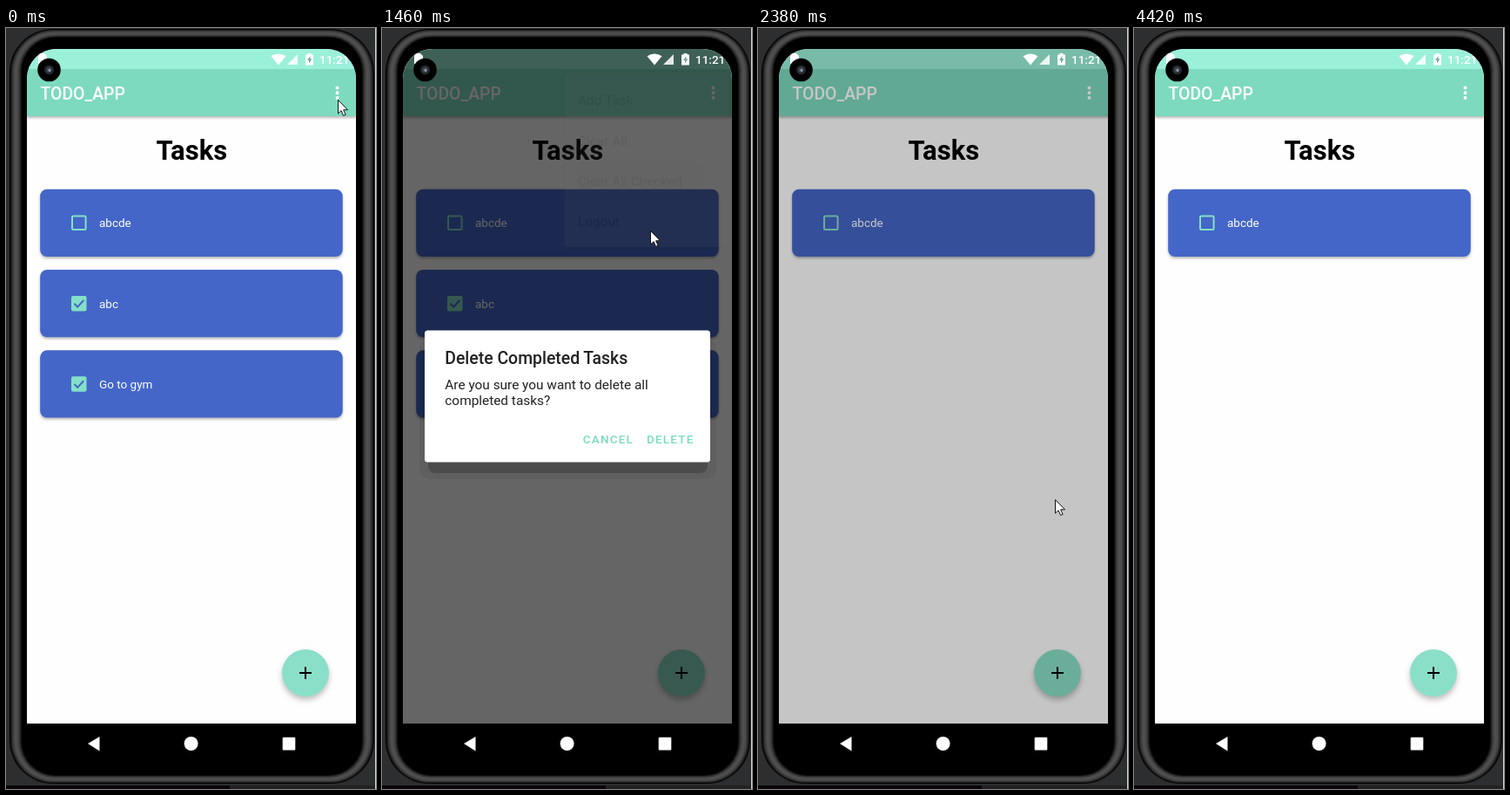
An HTML page that plays this animation: 425x872 px, repeating every 4.59 s.

```html
<!DOCTYPE html>
<html lang="en">
<head>
<meta charset="utf-8">
<title>Task list</title>
<style>
  html, body { margin: 0; width: 100%; height: 100%; overflow: hidden; background: #2c2e30; }
  svg { display: block; width: 425px; height: 872px; font-family: Roboto, sans-serif; }
  .medium { font-weight: 500; }
  .raised { filter: drop-shadow(0 2px 1.5px rgba(0, 0, 0, .28)); }
  .label { font-size: 13.5px; fill: #fff; }
  .item { font-size: 15.4px; fill: #212121; }
  .button { font: 500 13.5px Roboto, sans-serif; letter-spacing: 1.2px; fill: #7bdcc0; }
</style>
</head>
<body>
<svg viewBox="0 0 425 872">
  <defs>
    <clipPath id="screen"><path d="M24 797V58a34 34 0 0 1 34-34H368a34 34 0 0 1 34 34V797Z"/></clipPath>
    <clipPath id="reveal"><rect id="revealBox" y="48"/></clipPath>
  </defs>

  <rect width="425" height="872" fill="#2c2e30"/>
  <rect y="868" width="257" height="4" fill="#0b0508"/>
  <rect x="257" y="868" width="168" height="4" fill="#222"/>
  <rect x="424" width="1" height="872" fill="#d8d8d8"/>
  <g id="body"></g>

  <g clip-path="url(#screen)">
    <rect x="24" y="24" width="378" height="773" fill="#fefefe"/>
    <rect x="24" y="40" width="378" height="61" fill="#7ddabf" class="raised"/>
    <rect x="24" y="24" width="378" height="23" fill="#9bf0da"/>
    <text x="39.5" y="82" font-size="19.4" class="medium" fill="#fff">TODO_APP</text>
    <path d="M380.5 68.500v0M380.500 74.200v0M380.500 80v0" stroke="#fff" stroke-width="4" stroke-linecap="round"/>
    <text x="213.300" y="151" font-size="31" font-weight="700" text-anchor="middle">Tasks</text>

    <g id="cards"></g>

    <circle cx="344" cy="739" r="27" fill="#8adfc8" style="filter:drop-shadow(0 4px 3px rgba(0,0,0,.25))"/>
    <path d="M337 739h14M344 732v14" stroke="#000" stroke-width="2"/>

    <g id="menu" clip-path="url(#reveal)">
      <rect x="209.500" y="51" width="188.500" height="200" rx="3" fill="#fff" style="filter:drop-shadow(0 1.500px 2px rgba(0,0,0,.35))"/>
      <g id="press">
        <rect x="209.500" y="152" width="188.500" height="46" fill-opacity=".06"/>
        <rect x="222" y="152" width="146" height="46" rx="14" fill-opacity=".05"/>
      </g>
      <g id="items" class="item"></g>
    </g>

    <rect id="scrim" x="24" y="24" width="378" height="773"/>

    <g id="dialog">
      <g id="shadow">
        <rect x="43" y="356" width="341" height="161" rx="12" fill-opacity=".06"/>
        <rect x="53" y="360" width="321" height="150" rx="8" fill-opacity=".2"/>
      </g>
      <rect x="49" y="346.500" width="328" height="151" rx="3.500" fill="#fff"/>
      <text x="72.300" y="384.500" font-size="19.400" class="medium" fill="#212121">Delete Completed Tasks</text>
      <text x="72.300" y="414" class="item">Are you sure you want to delete all</text>
      <text x="72.300" y="432" class="item">completed tasks?</text>
      <text x="230.700" y="476" class="button">CANCEL</text>
      <text x="304" y="476" class="button">DELETE</text>
    </g>

    <!-- status icons -->
    <g fill="#fff">
      <path d="M37 29h7l3 3v9H37Z"/>
      <path d="M313 42.500L304.500 32.300Q313 26.500 321.500 32.300Z"/>
      <path d="M323 42L335 30V42Z" fill-opacity=".85"/>
      <path d="M344 30.500h2.500V29h4v1.500H353V42.500H344Z"/>
      <path d="M349.500 32l-3.500 5h2v3.500l3.300-5h-1.800Z" fill="#75a799"/>
      <text x="360" y="41" font-size="13.500" class="medium">11:21</text>
    </g>
  </g>

  <circle cx="49.500" cy="48" r="13.300"/>
  <circle cx="49.500" cy="48" r="5.500" fill="#24272d"/>
  <circle cx="49.500" cy="48" r="3" fill="#464d59"/>
  <circle cx="50" cy="48.500" r="1.200" fill="#a9b3c2"/>

  <g fill="#fff">
    <path d="M94 820l13.500-8v16.500Z"/>
    <circle cx="212.600" cy="820" r="8"/>
    <rect x="317.700" y="812.800" width="14.600" height="14.600" rx="1"/>
  </g>

  <path id="cursor" d="M.5.5V16l3.600-3.300 2.500 5.700 2.500-1.100-2.500-5.500h4.900Z" fill="#fff" stroke="#111"/>
</svg>

<script>
const LOOP = 4590, STEP = 60;
const OPEN = 50, ASK = 1280, CONFIRM = 2190;
const $ = id => document.getElementById(id);

// Cursor legs: start, end, then the point reached
const legs = [
  [110, 590, 293, 173],
  [ASK, 1760, 364, 454],
  [1770, 2010, 330, 482],
  [CONFIRM, 2310, 341, 539],
  [2310, 2670, 319, 617],
  [3700, 3760, 319, 618],
  [3940, 4420, 392, 890]
];

function card(label, i) {
  const done = i > 0;
  const box = done
    ? `<rect x="75" y="214.7" width="17.5" height="17.5" rx="2" fill="#84dfc8"/>
       <path d="M78.5 223.5l3.7 3.8 7-7.6" fill="none" stroke="#4466c8" stroke-width="2"/>`
    : `<rect x="76" y="215.5" width="15.6" height="15.6" rx="1.5" fill="none" stroke="#84dfc8" stroke-width="2"/>`;
  return `<g transform="translate(0 ${92.3 * i})" class="${done ? 'done' : ''}">
    <rect x="39.2" y="184.7" width="347.5" height="77.3" rx="8" fill="#4466c8" class="raised"/>
    ${box}<text x="107" y="228.3" class="label">${label}</text></g>`;
}

// Rounded metal rim: nested outlines, brightest halfway in
function rim(_, i) {
  const x = i, y = i * .7, grey = Math.round(80 * Math.sin(Math.PI * i / 14));
  return `<rect x="${4 + x}" y="${1 + y}" width="${419 - 2 * x}" height="${865 - 2 * y}"
    rx="${50 - x * .8}" fill="rgb(${grey},${grey},${grey})"/>`;
}

$('body').innerHTML = Array.from({ length: 15 }, rim).join('');
$('cards').innerHTML = ['abcde', 'abc', 'Go to gym'].map(card).join('');
$('items').innerHTML = ['Add Task', 'Clear All', 'Clear All Checked', 'Logout']
  .map((s, i) => `<text x="225" y="${88.3 + 46.2 * i}">${s}</text>`).join('');

const ramp = (t, start, len) => Math.min(1, Math.max(0, (t - start) / len));
const ease = p => p < .5 ? 4 * p ** 3 : 1 - 4 * (1 - p) ** 3;

// The picture advances in steps counted from the start of the current leg
function hold(t) {
  const start = legs.reduce((s, leg) => leg[0] <= t ? leg[0] : s, OPEN);
  return t < start ? t : start + Math.floor((t - start) / STEP) * STEP;
}

function cursorAt(t) {
  let x = 381, y = 82;
  for (const [start, end, toX, toY] of legs) {
    const p = ease(ramp(t, start, end - start));
    x += (toX - x) * p;
    y += (toY - y) * p;
  }
  return [Math.round(x), Math.round(y)];
}

const fade = (id, value) => $(id).setAttribute('opacity', value);

function draw(now) {
  const t = hold(now % LOOP);
  const opened = t < 110 ? 0 : ramp(t, OPEN, 180);
  const dialog = ramp(t, ASK, 85) - ramp(t, CONFIRM, 143);
  fade('menu', opened - ramp(t, ASK, 200));
  fade('press', ramp(t, ASK - STEP, 2 * STEP));
  fade('scrim', .6 * (ramp(t, ASK, 180) - ramp(t, CONFIRM, 288)));
  fade('dialog', dialog);
  fade('shadow', dialog);

  const box = $('revealBox');
  box.setAttribute('x', 404 - 200 * opened);
  box.setAttribute('width', 200 * opened);
  box.setAttribute('height', 212 * opened);

  for (const el of document.querySelectorAll('.done'))
    el.setAttribute('display', t > CONFIRM ? 'none' : 'inline');
  $('cursor').setAttribute('transform', `translate(${cursorAt(t)})`);
}

const begin = performance.now();
function tick() {
  draw(performance.now() - begin);
  requestAnimationFrame(tick);
}
tick();
</script>
</body>
</html>
```
